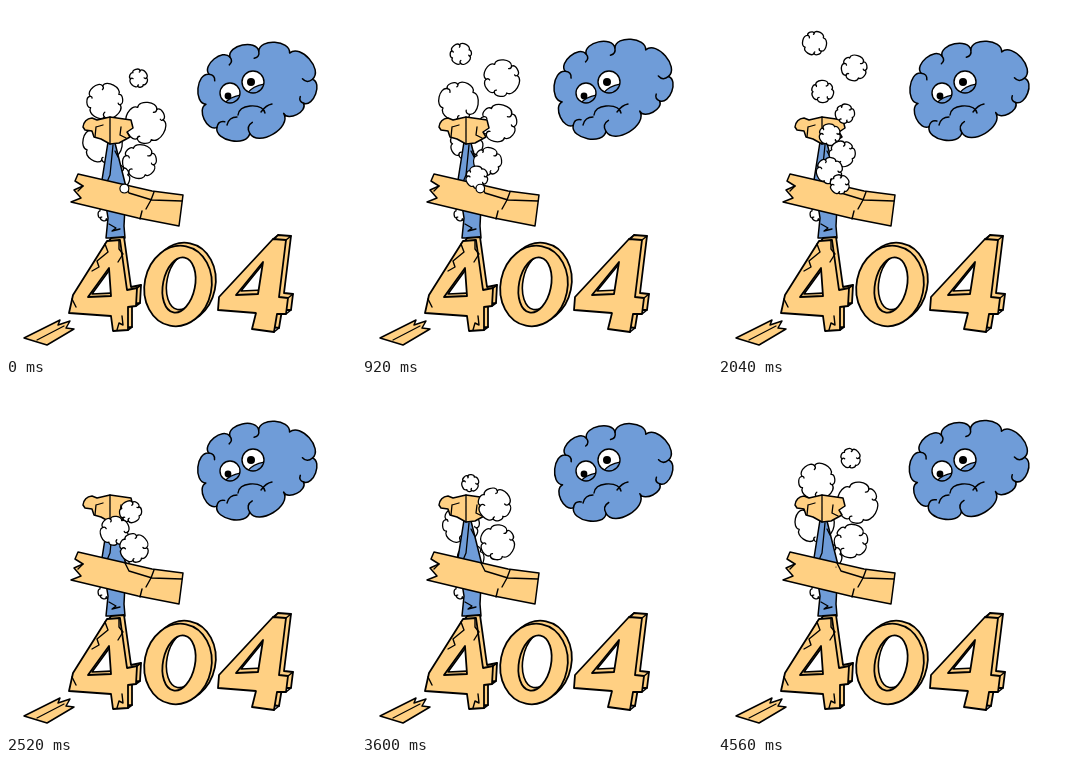
An HTML page with a canvas that plays this animation: 350 by 350 pixels, repeating every 4600 ms.

```html
<!DOCTYPE html>
<html lang="en">
<head>
<meta charset="utf-8">
<title>404</title>
<style>
html, body { margin: 0; width: 100%; height: 100%; overflow: hidden; background: #fff; }
canvas { display: block; width: 350px; height: 350px; }
</style>
</head>
<body>
<canvas id="stage"></canvas>
<script>
const LOOP = 4600, STEP = 40, TURN = Math.PI * 2;
const WOOD = '#ffd083', BLUE = '#6f9cd8', INK = '#000', WHITE = '#fff';
const canvas = document.getElementById('stage');
const ctx = canvas.getContext('2d');
const ratio = window.devicePixelRatio || 1;
canvas.width = canvas.height = 350 * ratio;

function paint(path, fill, width) {
  if (fill) { ctx.fillStyle = fill; ctx.fill(path); }
  if (width) { ctx.strokeStyle = INK; ctx.lineWidth = width; ctx.stroke(path); }
}

const shape = (d, fill, width = 1.5) => paint(new Path2D(d), fill, width);

function ellipse(x, y, rx, ry = rx, tilt = 0) {
  const path = new Path2D();
  path.ellipse(x, y, rx, ry, tilt, 0, TURN);
  return path;
}

function shifted(path, dx, dy) {
  const copy = new Path2D();
  copy.addPath(path, new DOMMatrix([1, 0, 0, 1, dx, dy]));
  return copy;
}

function clipped(path, drawInside) {
  ctx.save();
  ctx.clip(path);
  drawInside();
  ctx.restore();
}

// Clockwise outline with bulging edges; some arcs curl on inside
function scallop(points, bulge, curl, fill, width) {
  const outline = new Path2D(), curls = new Path2D();
  outline.moveTo(...points[0]);
  points.forEach(([x, y], i) => {
    const [u, v] = points[(i + 1) % points.length];
    const nx = (v - y) * bulge, ny = (x - u) * bulge;
    outline.bezierCurveTo(x + nx, y + ny, u + nx, v + ny, u, v);
    if (i % 3 === 2) return;
    curls.moveTo(u, v);
    curls.quadraticCurveTo(u - nx * curl, v - ny * curl,
      u - nx * curl + (x - u) * curl * 0.4, v - ny * curl + (y - v) * curl * 0.4);
  });
  outline.closePath();
  paint(outline, fill, width);
  paint(curls, null, width);
}

function puff(x, y, r, seed) {
  if (r < 5) return paint(ellipse(x, y, r), WHITE, 1.2);
  const lobes = 6;
  const points = Array.from({ length: lobes }, (_, i) => {
    const a = (i + 0.2 * Math.sin(seed * 3 + i * 2.4)) * TURN / lobes + seed;
    return [x + Math.cos(a) * r * 0.84, y + Math.sin(a) * r * 0.84];
  });
  scallop(points, 0.42, 0.4, WHITE, 1.3);
}

// Evenly timed puffs leave one vent, drifting left and right in turn.
// Their strength swells and fades once per loop.
const PUFFS = 10;

function steam(t, first, last) {
  for (let i = first; i < last; i++) {
    const birth = i * LOOP / PUFFS - 40;
    const age = (t - birth + LOOP) % LOOP;
    const strength = Math.cos((birth - 2900) / LOOP * TURN);
    const life = 2950 + 900 * strength;
    if (age >= life) continue;
    const rise = age / 3840;
    const side = i % 2 ? -1 : 1;
    const drift = Math.sin(Math.min(1, rise * 2.6) * Math.PI / 2);
    puff(118 + side * (14 + 8 * strength) * drift,
      183 - 167 * rise ** 1.3,
      (17 + 4 * strength) * Math.sin(age / life * Math.PI) ** 0.4,
      0.3 + i * 1.7);
  }
}

const cloudEdge = [[203, 68], [224, 51], [253, 45], [284, 47], [307, 73],
  [298, 97], [278, 107], [244, 127], [211, 121], [200, 98]];

function eye(x, y, r, px, py, pr) {
  const ball = ellipse(x, y, r);
  paint(ball, WHITE);
  clipped(ball, () => {
    paint(ellipse(px, py, pr), INK);
    shape(`M${x - r / 2} ${y + r}Q${x} ${y + 4} ${x + r + 1} ${y + 2}V${y + r + 2}Z`, BLUE, 1.3);
  });
  paint(ball, null, 1.4);
}

function cloud(t) {
  const wave = n => Math.sin(n * t / LOOP * TURN);
  const left = 193 + 2.5 * wave(2) + 2 * wave(3);
  const top = 34 - 3.5 * wave(1);
  const bottom = 134.5 - 2 * wave(1);
  const edge = cloudEdge.map(([x, y]) => [
    left + (x - 193) / 119 * (311.5 - left),
    top + (y - 34) / 100 * (bottom - top)
  ]);
  scallop(edge, 0.42, 0.5, BLUE, 1.5);
  eye(224, 87, 10, 222, 90, 3.4);
  eye(247, 76, 11, 245, 76, 4);
  shape('M232 109Q233 101 244 100Q257 99 259 107M255 106Q260 99 266 98M221 119Q223 111 231 111', null, 1.4);
}

function hammer() {
  puff(99, 208, 7, 0.4);
  shape('M102 136L109 137L120 181L118 220L119 232H100L102 212L96 174Z', BLUE);
  shape('M107 139L104 169L101 176M109 145L112 151M103 218L110 222L106 225L114 223', null, 1.3);
  shape('M77 121Q78 113 86 112L91 114L104 111L125 114L127 122L121 126L124 131L113 137L104 138L95 133L88 131L86 125L79 124Z', WOOD);
  shape('M104 111V138M90 121L89 131M90 121L97 119M115 121L114 129L120 132', null, 1.3);
}

function plank() {
  shape('M72 168L146 185L177 189L173 220L132 212L65 196L75 192L68 184L77 180L69 175Z', WOOD);
  shape('M119 179L123 187L146 194L176 195M148 186L145 194L140 203M136 205L134 213M77 180L72 185', null, 1.4);
}

// Solid glyph: the hole shows its lower and left walls
function solid(face, hole, dx, dy, joins) {
  paint(shifted(face, dx, dy), WOOD, 1.8);
  shape(joins, null, 1.6);
  paint(face, WOOD, 1.8);
  clipped(hole, () => paint(shifted(hole, dx, dy), WHITE, 1.6));
  paint(hole, null, 1.8);
}

function digits() {
  solid(new Path2D('M101 235L114 234L121 284L131 282L130 300L122 301L122 324L107 325L105 310L63 307L67 289Z'),
    new Path2D('M103 262L105 290L82 291Z'), 4, -3,
    'M131 282l4 -3M130 300l4 -3M122 324l4 -3');
  shape('M113 234L113 243L117 248L112 256M99 238L102 246L91 255L93 261L86 265M66 293L70 301M111 324L113 317L117 319L116 310', null, 1.4);
  solid(new Path2D('M267 233L280 234L273 291L282 292L280 308L271 308L268 326L246 323L250 307L212 304L213 291Z'),
    new Path2D('M257 256L252 288L230 289Z'), 5, -4,
    'M267 233l5 -4M280 234l5 -4M282 292l5 -4M280 308l5 -4M268 326l5 -4');
  solid(ellipse(172, 280, 33.5, 40.5, 0.2), ellipse(173, 279, 16, 28, 0.2), 4, -3, '');
}

function splinter() {
  shape('M18 332L54 314L52 319L64 315L60 322L68 323L41 339Z', WOOD);
  shape('M31 334L58 320', null, 1.2);
}

function draw(t) {
  ctx.setTransform(ratio, 0, 0, ratio, 0, 0);
  ctx.fillStyle = WHITE;
  ctx.fillRect(0, 0, 350, 350);
  ctx.lineJoin = ctx.lineCap = 'round';
  cloud(t);
  steam(t, PUFFS / 2, PUFFS);
  hammer();
  plank();
  digits();
  splinter();
  steam(t, 0, PUFFS / 2);
}

const start = performance.now();
function tick() {
  const t = (performance.now() - start) % LOOP;
  draw(Math.floor(t / STEP) * STEP);
  requestAnimationFrame(tick);
}
tick();
</script>
</body>
</html>
```
